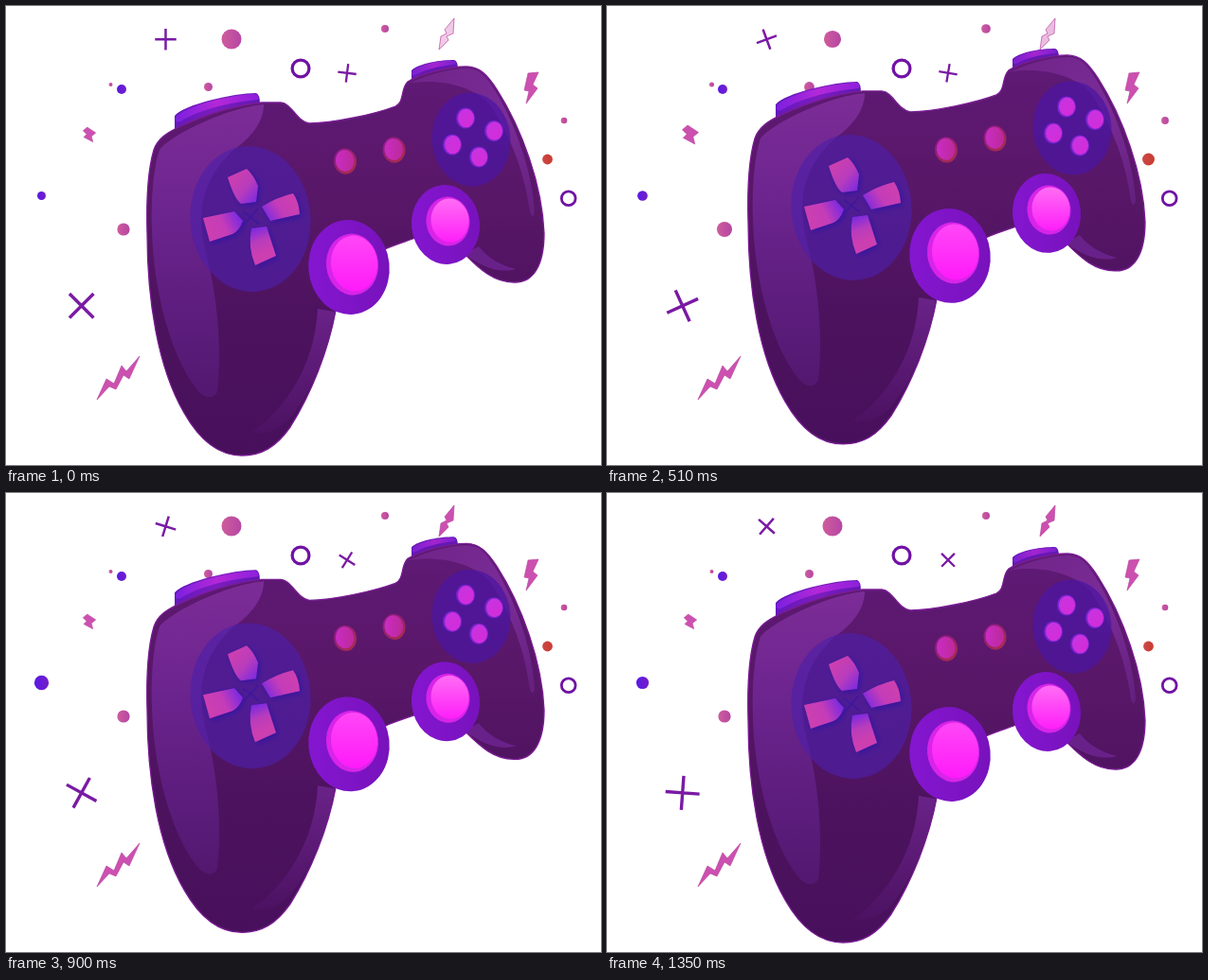
Write an HTML page with a canvas that moves like this. It is 628 px wide and 485 px high and loops after 1380 ms.

```html
<!DOCTYPE html>
<html lang="en">
<head>
<meta charset="utf-8">
<title>Game controller</title>
<style>
html, body { margin: 0; width: 100%; height: 100%; overflow: hidden; background: #fff; }
canvas { display: block; }
</style>
</head>
<body>
<canvas id="stage" width="628" height="485"></canvas>
<script>
const ctx = document.getElementById('stage').getContext('2d');
const LOOP = 1380, STEP = 30;
const RAD = Math.PI / 180;

// Linear ping-pong: 0 at the start of each period, 1 halfway through.
const swing = (t, period) => {
  const p = (((t / period) % 1) + 1) % 1;
  return 1 - Math.abs(2 * p - 1);
};

function linear(x0, y0, x1, y1, ...colors) {
  const g = ctx.createLinearGradient(x0, y0, x1, y1);
  colors.forEach((c, i) => g.addColorStop(i / (colors.length - 1), c));
  return g;
}

function ellipse(x, y, rx, ry, fill, tilt = 0) {
  ctx.beginPath();
  ctx.ellipse(x, y, rx, ry, tilt, 0, 2 * Math.PI);
  ctx.fillStyle = fill;
  ctx.fill();
}

function shape(d, fill, stroke, width = 1) {
  const p = new Path2D(d);
  ctx.fillStyle = fill;
  ctx.fill(p);
  if (stroke) {
    ctx.strokeStyle = stroke;
    ctx.lineWidth = width;
    ctx.stroke(p);
  }
}

function ring(x, y, r, width) {
  ctx.beginPath();
  ctx.arc(x, y, r, 0, 2 * Math.PI);
  ctx.strokeStyle = '#7012a4';
  ctx.lineWidth = width;
  ctx.stroke();
}

function cross(x, y, arm, width, degrees) {
  ctx.save();
  ctx.translate(x, y);
  ctx.rotate(degrees * RAD);
  ctx.beginPath();
  ctx.moveTo(-arm, 0);
  ctx.lineTo(arm, 0);
  ctx.moveTo(0, -arm);
  ctx.lineTo(0, arm);
  ctx.strokeStyle = '#7a1aa4';
  ctx.lineWidth = width;
  ctx.stroke();
  ctx.restore();
}

function bolt(d, alpha = 1) {
  ctx.globalAlpha = alpha;
  shape(d, '#cc50b0');
  ctx.globalAlpha = 1;
  ctx.strokeStyle = '#b8489f';
  ctx.lineWidth = 0.7;
  ctx.stroke(new Path2D(d));
}

const PINK = ['#cf5c9c', '#b546a4'];
const VIOLET = ['#5a18e8', '#7420c4'];
const ORANGE = ['#cc4848', '#c83c30'];

// x, y, radius, growth, period, colours
const dots = [
  [238, 35, 10.5, -5.4, 450, PINK],
  [124, 236, 6.6, 5.4, 450, PINK],
  [213.5, 85.5, 4.5, 3.3, 450, PINK],
  [110.5, 83, 2, 2, 450, PINK],
  [400, 24, 4, 3.2, 450, PINK],
  [589, 121, 3.3, 2.3, 450, PINK],
  [571.5, 162, 5.4, 3.9, 450, ORANGE],
  [122, 88, 5, 0, 450, VIOLET],
  [37.5, 200.5, 4.5, 3.4, 585, VIOLET]
];

function drawParticles(t) {
  for (const [x, y, r, grow, period, colors] of dots) {
    const size = r + grow * swing(t, period);
    ellipse(x, y, size, size, linear(x - size, y, x + size, y, ...colors));
  }
  ring(311, 66, 8.9, 3.3);
  ring(593.7, 203.3, 7.4, 2.8);

  const slow = swing(t, 585), quick = swing(t, 525);
  cross(79.7, 316.8, 18, 3.4, 45 + 80 * slow);
  cross(168.5, 35.3, 11.2, 2.5, -79 * slow);
  cross(360, 70.8, 9.8, 2.3, 7 + 44 * quick);

  const phase = t % 450;
  bolt('M141 370L127 386L122 380L114 399L106 394L96 416L109 402L116 405L124 390L130 394Z',
    phase > 100 && phase < 255 ? 0.65 : 1);
  bolt('M473 13L463 25L465 29L459 32L457 46L467 36L465 32L472 29Z',
    Math.min(1, 0.3 + 1.5 * quick));
  bolt('M551 71L562 70L556 83L561 87L549 103L552 90L547 89Z');

  const scale = 0.3 + 0.75 * swing(t + 135, 450);
  ctx.save();
  ctx.translate(88, 135.5);
  ctx.scale(scale, scale);
  bolt('M-3 -10L9 -2L3 3L5 11L-8 4L-4 0L-9 -5Z');
  ctx.restore();
}

function drawTriggers() {
  shape('M178 131L178 116C188 104 240 92 264 92Q268 93 268 104L240 112Z',
    linear(178, 0, 268, 0, '#6418bc', '#7c1cc0', '#6018b4'));
  shape('M179 118C187 106 240 93 263 93Q268 94 266 99C230 102 200 112 184 122Q178 124 179 118Z',
    linear(178, 110, 268, 96, '#7c20e0', '#b428d8', '#8c20dc'));
  shape('M428 78L428 68C436 60 460 57 473 57Q477 58 477 67L450 74Z', '#6418b4');
  shape('M429 69C437 61 460 57 473 58Q477 59 473 62C458 63 440 68 432 73Q427 74 429 69Z',
    linear(428, 0, 477, 0, '#7820d0', '#a424d0', '#7420d0'));
}

function drawBody() {
  shape('M149 240C148 205 150 172 156 152C160 140 170 134 182 128C210 115 240 105 270 102' +
    'L290 102C302 103 306 121 320 124C345 124 390 114 411 106C421 101 416 88 424 80' +
    'C440 70 470 64 486 64C500 64 508 73 518 88C545 130 566 190 568 240' +
    'C568 275 556 293 536 292C515 292 500 278 486 264L440 242C425 248 410 252 400 257' +
    'L348 322C340 365 322 410 300 445C285 466 270 475 249 475' +
    'C225 475 205 460 188 430C160 382 149 310 149 240Z',
    linear(0, 65, 0, 475, '#5f1a76', '#591768', '#4c125e', '#48105c'), '#7a1c94', 1.3);

  shape('M272 104C272 125 255 142 240 152C205 185 200 220 212 265C224 310 228 370 223 408' +
    'C218 416 210 414 204 408C175 375 155 300 154 235C153 200 156 170 162 152' +
    'C172 138 230 108 272 104Z',
    linear(0, 105, 0, 412, '#7c2c96', '#6e2590', '#5f1e80', '#531870'));
  shape('M347 323C340 365 322 408 300 436C285 450 270 453 260 450C295 425 326 380 329 320Z',
    linear(0, 320, 0, 452, '#6a2288', '#4c1262'));
  shape('M425 82C445 72 470 66 487 66C500 66 507 75 516 89C540 128 556 180 558 218' +
    'Q556 226 553 218C548 180 535 142 512 106C495 84 455 76 425 82Z',
    linear(425, 75, 558, 220, '#702488', '#7b2c98', '#64207e'));
  shape('M484 262C502 276 522 283 538 278C522 274 508 266 499 254Z', '#69218a');
}

function drawPad() {
  ellipse(258, 225, 63.5, 77, 'rgba(78,32,170,.65)', -0.08);
  ctx.save();
  ctx.shadowColor = '#3414a0';
  ctx.shadowBlur = 6;
  ctx.shadowOffsetX = 2;
  ctx.shadowOffsetY = 2;
  const pink = '#cc3fb0', violet = '#7c2ae0';
  shape('M234 181L254 172Q261 178 266 190L264 207L248 209Q241 204 234 181Z',
    linear(238, 182, 265, 206, pink, '#b83cbc', violet));
  shape('M270 212Q286 202 303 198Q309 206 310 220L279 227Z',
    linear(304, 204, 274, 224, pink, '#c43cb8', violet));
  shape('M259 235L275 233L285 264L263 274Q255 255 259 235Z',
    linear(270, 262, 260, 236, pink, '#b83cbc', violet));
  shape('M208 224L241 217L250 227Q246 238 239 241L215 249Z',
    linear(213, 238, 246, 222, pink, '#c43cb8', violet));
  ctx.restore();
  ctx.beginPath();
  ctx.moveTo(250, 217);
  ctx.lineTo(267, 230);
  ctx.moveTo(266, 214);
  ctx.lineTo(250, 232);
  ctx.strokeStyle = '#40189c';
  ctx.lineWidth = 2;
  ctx.stroke();
}

function drawButtons() {
  ellipse(491, 141, 41.5, 49.5, 'rgba(76,22,164,.72)', -0.08);
  for (const [x, y] of [[485, 118.5], [515, 132], [471, 146.5], [499, 159.5]]) {
    ellipse(x, y, 10, 11, '#7a22d0');
    ellipse(x + 0.5, y, 8.5, 9.8, linear(x - 8, y - 8, x + 8, y + 8, '#c634e0', '#d42cd8'));
  }
  for (const [x, y] of [[358, 164], [409.5, 152]]) {
    ellipse(x, y, 12, 13.7, linear(x - 8, y - 8, x + 8, y + 10, '#8c1c80', '#a82c50'), -0.1);
    ellipse(x - 0.3, y - 0.6, 9.8, 11.5, linear(x - 8, y, x + 8, y, '#c82cc0', '#bd2a9c'), -0.1);
  }
}

function drawStick(x, y, rx, ry, capX, capY, capRx, capRy, top) {
  ellipse(x, y, rx, ry, linear(x - rx, y, x + rx, y, '#8416d0', '#7812bc'), -0.1);
  ellipse(capX, capY, capRx, capRy, '#d824e8', -0.1);
  ellipse(capX + 2, capY - 1, capRx - 3, capRy - 3,
    linear(capX, capY - capRy, capX, capY + capRy, top, '#ff18fa'), -0.1);
}

function draw(t) {
  ctx.fillStyle = '#fff';
  ctx.fillRect(0, 0, 628, 485);
  drawParticles(t);

  ctx.save();
  ctx.translate(0, t < 1350 ? -16 * swing(t, 1350) : 0);
  drawTriggers();
  drawBody();
  drawPad();
  drawButtons();
  drawStick(464, 231, 36, 42, 466.5, 227.5, 23, 26, '#ff70f4');
  drawStick(362, 276, 42.7, 50, 365.5, 273, 27.5, 32.5, '#ff48f6');
  ctx.restore();
}

const start = performance.now();
function tick() {
  const t = (performance.now() - start) % LOOP;
  draw(Math.floor(t / STEP) * STEP);
  requestAnimationFrame(tick);
}
tick();
</script>
</body>
</html>
```
